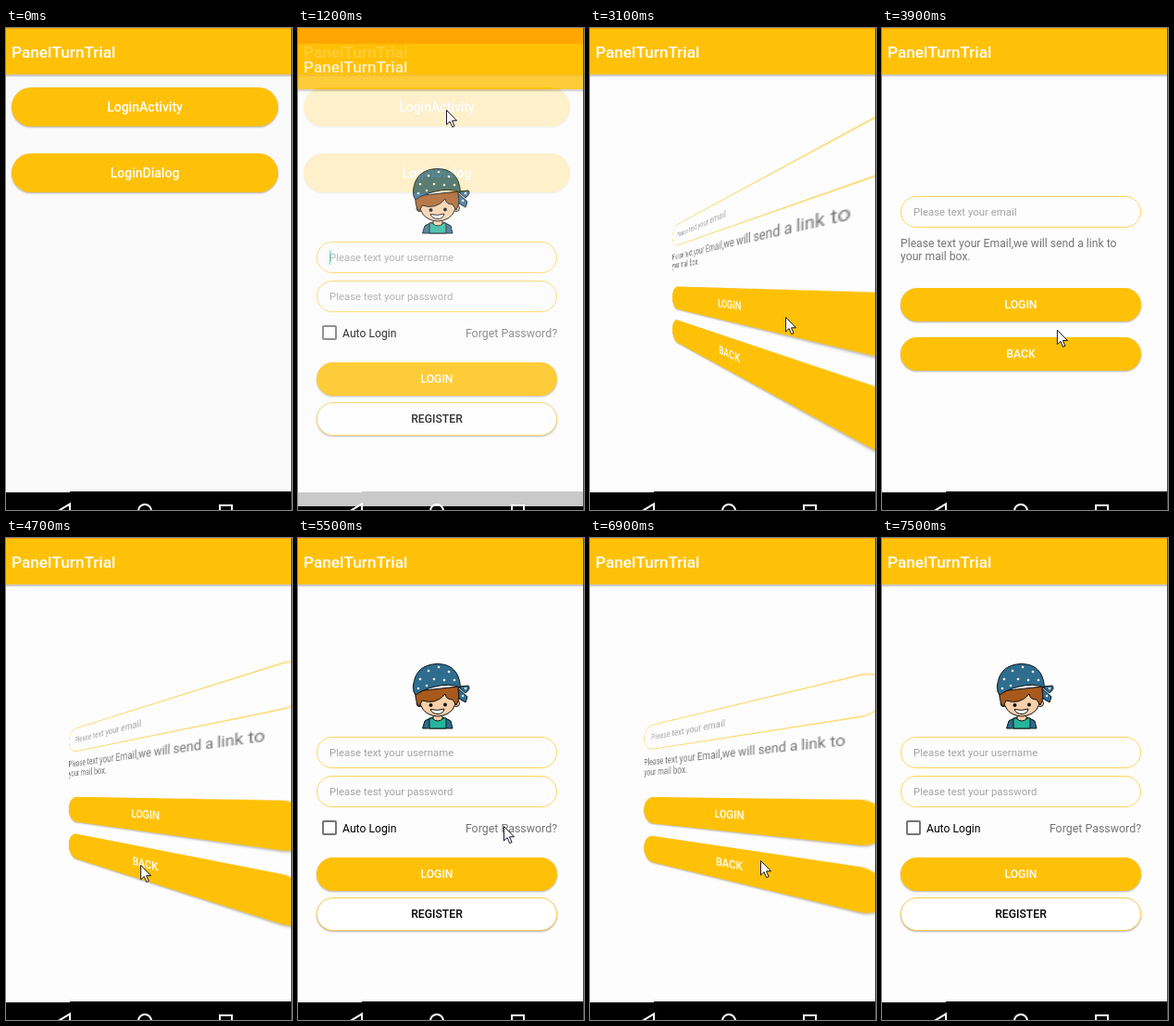
Recreate the animation shown at these times as an HTML page. Size 309 px wide and 519 px high, loop 7600 ms.

```html
<!DOCTYPE html>
<html lang="en">
<head>
<meta charset="utf-8">
<title>Flipping login panel</title>
<style>
  html, body { margin: 0; width: 100%; height: 100%; overflow: hidden; background: #fafafa; }
  body { position: relative; font: 12.2px Roboto, sans-serif; color: #000; }
  body *, .bar::before { position: absolute; box-sizing: border-box; white-space: nowrap; }
  br { position: static !important; }
  .bar { left: 0; top: 0; width: 100%; height: 50px; padding-left: 6px; background: #ffc107;
    font: 500 17.2px/52px Roboto, sans-serif; color: #fff; box-shadow: 0 2px 1px rgba(0,0,0,.2); }
  .bar::before { content: ""; left: 0; top: -24px; width: 100%; height: 25px; background: #ffa000; }
  .btn { left: 20px; width: 260px; height: 36px; border-radius: 18px; background: #ffc107; color: #fff;
    font-weight: 500; line-height: 36px; text-align: center; box-shadow: 0 1px 2px rgba(0,0,0,.3); }
  .big { left: 6px; width: 288px; height: 42px; border-radius: 21px; font-size: 14px; line-height: 43px; }
  .plain { background: #fff; color: #000; border: 1px solid #ffcf4d; line-height: 35px; }
  .field { left: 20px; width: 260px; height: 34px; padding-left: 13px; border: 1px solid #ffd35c;
    border-radius: 17px; font-size: 11.4px; line-height: 33px; color: #a3a3a3; }
  .grey { color: #757575; line-height: 14.3px; }
  #nav { left: 0; top: 499px; width: 308px; height: 20px; background: #000; }
  #login { left: 0; top: 0; width: 308px; height: 499px; background: #fdfdfd; }
  #view { left: 0; top: 0; width: 308px; height: 499px; clip-path: inset(53px 0 0); overflow: hidden;
    perspective: 165px; perspective-origin: 150px 275px; }
  .panel { left: 0; top: 0; width: 300px; height: 499px; transform-origin: 150px 275px; }
  #box { left: 26px; top: 304px; width: 16px; height: 16px; border: 2px solid #757575; border-radius: 2px; }
  #caret { left: 34px; top: 223px; width: 1px; height: 16px; background: #1de9b6; }
  #edge { left: 308px; top: 0; width: 1px; height: 519px; background: #2f4a58; }
  svg { left: 0; top: 0; overflow: visible; }
</style>
</head>
<body>
  <div class="bar">PanelTurnTrial</div>
  <div class="btn big" style="top:64px">LoginActivity</div>
  <div class="btn big" style="top:134.5px">LoginDialog</div>
  <div id="nav"></div>

  <div id="login">
    <div class="bar">PanelTurnTrial</div>
    <div id="view">
      <div class="panel" id="front">
        <svg width="300" height="210" stroke="#0c1418" stroke-linejoin="round">
          <path d="M134.500 205L137 197Q142 193 151 193T165 197L167 205Z" fill="#2c6c8c"/>
          <path d="M142 205V194H160V205Z" fill="#25b59b"/>
          <g fill="#f9d0a8">
            <path d="M146 190V195Q151 199 156 195V190Z"/>
            <circle cx="131.500" cy="178" r="3.500"/><circle cx="171" cy="178" r="3.500"/>
            <path d="M132 164Q129 183 140 189Q151 195 162 189Q173 183 170 164Z"/>
          </g>
          <path d="M127 165Q126 175 131 182L134 175Q149 180 159 168Q160 174 167 174L171 180Q176 171 173 160Z" fill="#a8591b"/>
          <g fill="#0c1418" stroke="none">
            <ellipse cx="143.500" cy="180" rx="2" ry="2"/><ellipse cx="159" cy="179.500" rx="2" ry="2"/>
          </g>
          <path d="M143 184.500Q151 186.500 158 184Q157 189.500 151 189.500T143 184.500Z" fill="#fff"/>
          <g fill="#2f6d8f">
            <path d="M173 160L184 159Q187 162 181 167ZM173 162L183 171L181 177L174 173Z"/>
            <path d="M124.500 159Q127 136 151 135.500Q174 136 175.500 161Q164 156 148 160Q135 163 127 169Q124 166 124.500 159Z"/>
          </g>
          <path d="M132 152h0M141 143h0M152 139h0M163 144h0M147 152h0M158 153h0M169 153h0M130 162h0M139 159h0M181 162h0M178 170h0"
            stroke="#fff" stroke-width="2.600" stroke-linecap="round"/>
        </svg>
        <div class="field" style="top:214px">Please text your username</div>
        <div id="caret"></div>
        <div class="field" style="top:256px">Please test your password</div>
        <div id="box"></div>
        <div style="left:48px;top:306px">Auto Login</div>
        <div class="grey" style="right:20px;top:306px;font-size:12.4px">Forget Password?</div>
        <div class="btn" style="top:344px">LOGIN</div>
        <div class="btn plain" style="top:387px">REGISTER</div>
      </div>
      <div class="panel" id="back">
        <div class="field" style="top:181px">Please text your email</div>
        <div class="grey" style="left:20px;top:225px">Please text your Email,we will send a link to<br>your mail box.</div>
        <div class="btn" style="top:280px">LOGIN</div>
        <div class="btn" style="top:333px">BACK</div>
      </div>
    </div>
  </div>

  <svg width="308" height="519" fill="none" stroke="#fff" stroke-width="2">
    <path d="M69 512.500V528L56 520.300ZM231 514h13v13h-13Z"/>
    <circle cx="150" cy="520" r="7"/>
    <path d="M0 499.500h69" stroke-width="1"/>
  </svg>
  <div id="edge"></div>
  <svg id="mouse" width="13" height="20">
    <path d="M.5.5V16l3.600-3.400 2.600 6 2.400-1-2.600-5.800H11.500Z" fill="#fff" stroke="#14142c"/>
  </svg>

<script>
const LOOP = 7600, ENTER = 1135, FLIP = 500;
const $ = id => document.getElementById(id);
const clamp = v => Math.min(1, Math.max(0, v));

// time, x, y of the pointer tip
const path = [
  [200, 11, 498], [800, 160, 88], [1500, 160, 88], [1800, 162, 330], [1900, 162, 330],
  [2600, 211, 311], [3700, 211, 311], [4300, 145, 352], [4700, 145, 352], [5200, 230, 273],
  [5500, 222, 310], [5800, 222, 310], [6300, 191, 337], [6400, 187, 343], [6500, 187, 343],
  [6600, 184, 347], [7000, 184, 347]
];

function pointer(t) {
  const i = path.findIndex(k => k[0] > t);
  if (i < 1) return null;
  const [a, b] = [path[i - 1], path[i]], p = (t - a[0]) / (b[0] - a[0]);
  return [1, 2].map(n => a[n] + (b[n] - a[n]) * p);
}

function flip(t, start) {
  const p = clamp((t - start) / FLIP);
  return 180 * (p < .5 ? 2 * p * p : 1 - 2 * (1 - p) ** 2);
}

function show(el, on) { el.style.visibility = on ? "visible" : "hidden"; }

function draw(t) {
  const slide = 45 * (1 - clamp((t - ENTER) / 350)) ** 5;
  $("login").style.opacity = 1 - (1 - clamp((t - ENTER) / 200)) ** 4;
  $("login").style.transform = slide > .05 ? `translateY(${Math.round(slide)}px)` : "none";
  show($("login"), t > ENTER);

  const turn = flip(t, 2775) - flip(t, 4559) + flip(t, 5871) - flip(t, 6775);
  $("front").style.transform = `rotateY(${turn}deg)`;
  $("back").style.transform = `rotateY(${turn - 180}deg)`;
  $("front").style.display = turn < 90 ? "block" : "none";
  $("back").style.display = turn < 90 ? "none" : "block";
  $("caret").style.opacity = t < 2600 && (t - 1100) % 1000 < 500 ? 1 : 0;

  const tip = pointer(t);
  show($("mouse"), tip);
  if (tip) $("mouse").style.transform = `translate(${tip[0]}px, ${tip[1]}px)`;
}

const begin = performance.now();
function tick() {
  draw((performance.now() - begin) % LOOP);
  requestAnimationFrame(tick);
}
tick();
</script>
</body>
</html>
```
